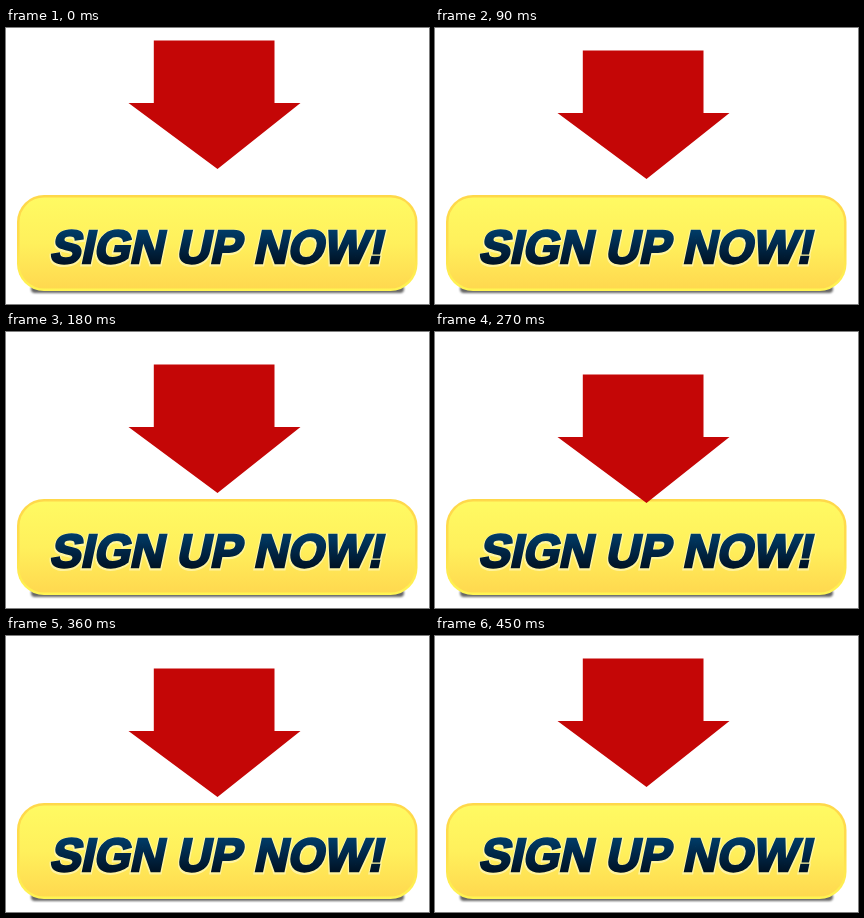
Write an HTML page with a canvas that moves like this. It is 423x276 px and loops after 0.54 s.

```html
<!DOCTYPE html>
<html lang="en">
<head>
<meta charset="utf-8">
<title>Sign up</title>
<style>
html, body { margin: 0; width: 100%; height: 100%; overflow: hidden; background: #fff; }
canvas { display: block; }
</style>
</head>
<body>
<canvas id="stage" width="423" height="276"></canvas>
<script>
const ctx = document.getElementById('stage').getContext('2d');
const STEP_MS = 90, STEPS = 6, STEP_PX = 10;

function vertical(y0, y1, ...colors) {
  const g = ctx.createLinearGradient(0, y0, 0, y1);
  colors.forEach((c, i) => g.addColorStop(i / (colors.length - 1), c));
  return g;
}

function roundBox(x, y, w, h, r, fill) {
  ctx.beginPath();
  ctx.roundRect(x, y, w, h, r);
  ctx.fillStyle = fill;
  ctx.fill();
}

function label(text, x, y) {
  ctx.save();
  ctx.transform(1, 0, -0.21, 1, x, y);
  ctx.font = 'bold 46.5px "Liberation Sans", Arial, sans-serif';
  ctx.fontKerning = 'none';
  ctx.lineJoin = 'miter';
  ctx.miterLimit = 3;

  // pale halo, then the letters thickened to a heavy weight
  ctx.lineWidth = 5;
  ctx.strokeStyle = 'rgba(255,250,190,0.7)';
  ctx.strokeText(text, 0, 0.5);
  ctx.fillStyle = ctx.strokeStyle = vertical(-33, 1, '#003c68', '#002646', '#001224');
  ctx.lineWidth = 2.4;
  ctx.strokeText(text, 0, 0);
  ctx.fillText(text, 0, 0);
  ctx.restore();
}

function button() {
  // soft contact shadow under the lower edge
  ctx.save();
  ctx.filter = 'blur(1.2px)';
  roundBox(25, 257, 373, 8, 4, 'rgba(50,50,50,0.75)');
  ctx.restore();

  roundBox(11, 167, 400.5, 96, 27, vertical(167, 263, '#ffd84a', '#ffdc4c', '#fff552'));
  roundBox(13.5, 169.5, 395.5, 91, 24.5, vertical(170, 260, '#fffa62', '#fff05c', '#ffd94f'));
  label('SIGN UP NOW!', 43, 235);
}

function arrow(y) {
  ctx.beginPath();
  [[147.8, -0.4], [268.5, -0.4], [268.5, 62], [294.5, 62], [211.5, 128], [122.5, 62], [147.8, 62]]
    .forEach(([px, py]) => ctx.lineTo(px, y + py));
  ctx.closePath();
  ctx.fillStyle = '#c40606';
  ctx.fill();
}

function draw(now) {
  const step = Math.floor(now / STEP_MS) % STEPS;
  const drop = STEP_PX * (STEPS / 2 - Math.abs(STEPS / 2 - step));
  ctx.fillStyle = '#fff';
  ctx.fillRect(0, 0, 423, 276);
  button();
  arrow(13 + drop);
}

let start;
function tick(now) {
  start ??= now;
  draw(now - start);
  requestAnimationFrame(tick);
}
draw(0);
requestAnimationFrame(tick);
</script>
</body>
</html>
```
